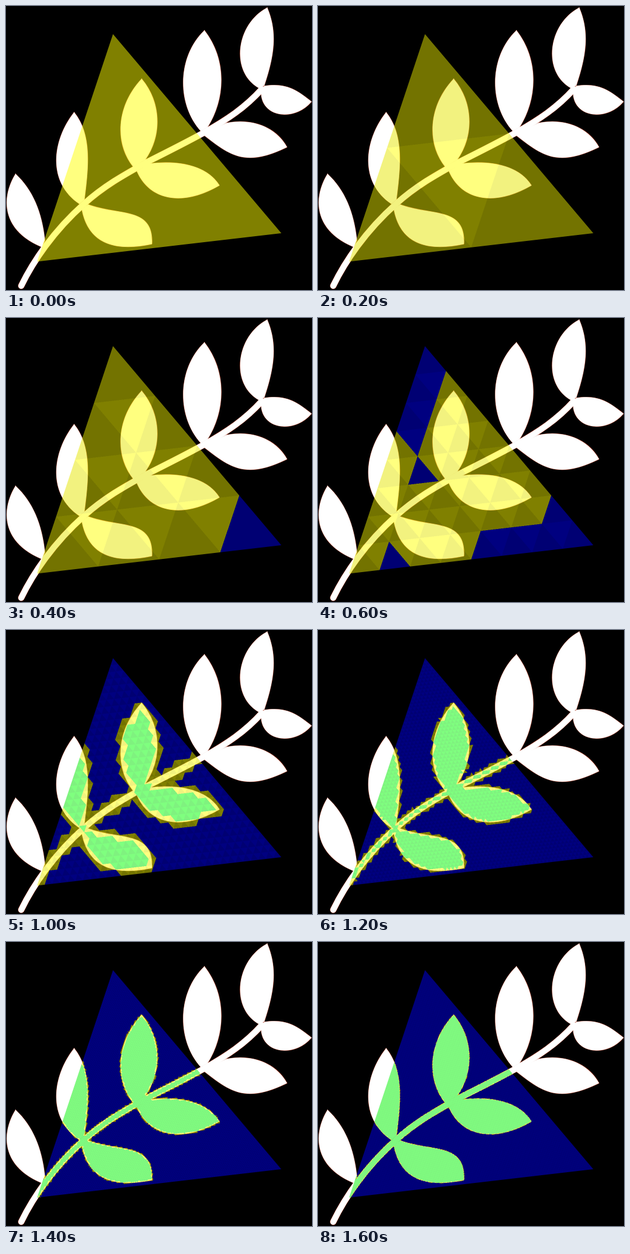
Recreate the animation shown at these times as an HTML page with a canvas. Size 512x475 px, loop 1800 ms.

```html
<!DOCTYPE html>
<html lang="en">
<head>
<meta charset="utf-8">
<title>Triangle subdivision</title>
<style>
  html, body { margin: 0; width: 100%; height: 100%; overflow: hidden; background: #000; }
  canvas { display: block; }
</style>
</head>
<body>
<canvas id="stage" width="512" height="475"></canvas>
<script>
const W = 512, H = 475, STEP = 200, LEVELS = 9, SS = 2;

const A = [179, 47], B = [52, 427.5], C = [460.7, 380];

const leaves = new Path2D(`
  M16 281C45 308 60 345 65 392L60 403C-8 375 -8 320 16 281Z
  M114 178C144 215 138 270 131 324L123 331C69 295 77 225 114 178Z
  M127 340C138 398 182 411 244 398C247 335 190 352 137 332Z
  M227 122C259 160 262 215 233 257L213 269C182 230 184 168 227 122Z
  M219 276C240 325 295 336 357 300C335 265 285 258 239 264Z
  M332 41C370 90 367 155 337 203L326 209C286 165 286 85 332 41Z
  M330 215C375 250 400 270 470 236C452 203 412 187 368 196Z
  M437 3C455 45 448 85 432 133L423 137C375 110 385 30 437 3Z
  M432 134C470 128 488 142 511 160C484 192 430 188 427 147Z`);
const stem = new Path2D(
  'M25.5 468C45 428 79 377 130 331.5C165 300 200 281 236 261' +
  'C268 245 298 230 329 213C370 190 400 170 428 139');

function makeCanvas(scale) {
  const cv = document.createElement('canvas');
  cv.width = W * scale;
  cv.height = H * scale;
  const g = cv.getContext('2d');
  g.scale(scale, scale);
  return g;
}

function drawBranch(g) {
  g.fillStyle = '#000';
  g.fillRect(0, 0, W, H);
  g.lineCap = g.lineJoin = 'round';
  for (const [color, edge] of [['#a52a10', 1.4], ['#fff', 0.6]]) {
    g.fillStyle = g.strokeStyle = color;
    g.lineWidth = edge;
    g.fill(leaves);
    g.stroke(leaves);
    g.lineWidth = 9.5 + edge;
    g.stroke(stem);
  }
}

const maskCtx = makeCanvas(SS);
drawBranch(maskCtx);
const mask = maskCtx.getImageData(0, 0, W * SS, H * SS).data;

const ab = [B[0] - A[0], B[1] - A[1]];
const bc = [C[0] - B[0], C[1] - B[1]];
const cross = (p, q) => p[0] * q[1] - p[1] * q[0];
const det = cross(ab, bc);

// Calls fn(pixel, cell, inside) for samples in or next to the triangle.
function eachSample(n, fn) {
  const w = W * SS, max = 1 - 1e-6;
  for (let y = (A[1] - 3) * SS; y < (B[1] + 3) * SS; y++) {
    for (let x = (B[0] - 3) * SS; x < (C[0] + 3) * SS; x++) {
      const px = (x + 0.5) / SS - A[0], py = (y + 0.5) / SS - A[1];
      let u = (px * bc[1] - py * bc[0]) / det;
      let v = (ab[0] * py - ab[1] * px) / det;
      if (u < -0.01 || u > 1.01 || v < -0.01 || v > u + 0.01) continue;
      const inside = u >= 0 && u < 1 && v >= 0 && v <= u;
      u = Math.min(Math.max(u, 0), max);
      v = Math.min(Math.max(v, 0), u);
      const r = Math.floor(u * n), c = Math.floor(v * n);
      const flipped = v * n - c > u * n - r ? 1 : 0;
      fn(y * w + x, (r * n + c) * 2 + flipped, inside);
    }
  }
}

// Each cell is inside the branch (1), outside it (2) or crossed by its edge (3).
function drawCells(level) {
  const n = 2 ** level;
  const state = new Uint8Array(n * n * 2);
  eachSample(n, (p, cell, inside) => {
    if (inside) state[cell] |= mask[p * 4 + 1] > 127 ? 1 : 2;
  });
  const g = makeCanvas(SS);
  const img = g.createImageData(W * SS, H * SS);
  eachSample(n, (p, cell) => {
    const s = state[cell] || 2;
    const shade = level === 0 || cell & 1 ? 255 : 230;
    const i = p * 4;
    img.data[i] = s === 3 ? shade : 0;
    img.data[i + 1] = s === 2 ? 0 : shade;
    img.data[i + 2] = s === 2 ? shade : 0;
    img.data[i + 3] = 255;
  });
  g.putImageData(img, 0, 0);
  return g.canvas;
}

function render(level) {
  const g = makeCanvas(1);
  drawBranch(g);
  g.beginPath();
  for (const p of [A, B, C]) g.lineTo(...p);
  g.closePath();
  g.clip();
  g.globalAlpha = 0.5;
  g.drawImage(drawCells(level), 0, 0, W, H);
  return g.canvas;
}

const ctx = document.getElementById('stage').getContext('2d');
const cache = [];
let shown = -1;

function tick() {
  const level = Math.floor(performance.now() / STEP) % LEVELS;
  if (level !== shown) {
    shown = level;
    cache[level] = cache[level] || render(level);
    ctx.drawImage(cache[level], 0, 0);
  }
  requestAnimationFrame(tick);
}
tick();
</script>
</body>
</html>
```
